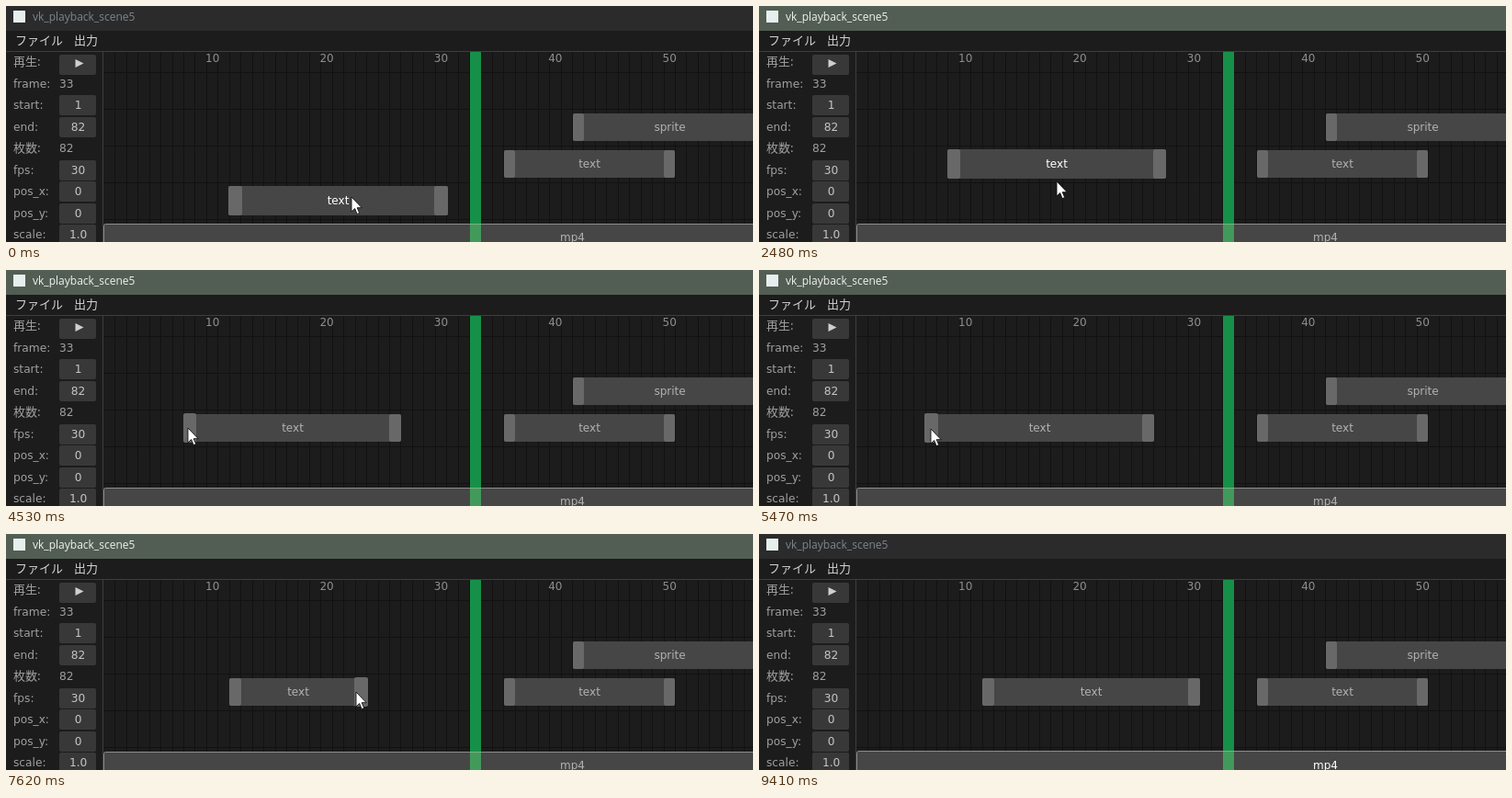
Animation, 813 px wide and 257 px high, one loop 9430 ms. Source, as an HTML page:

```html
<!DOCTYPE html>
<html lang="ja">
<head>
<meta charset="utf-8">
<title>Timeline editor</title>
<style>
  html, body { margin: 0; width: 100%; height: 100%; overflow: hidden; background: #1c1c1c; }
  svg { display: block; }
  text { font: 12px "DejaVu Sans", "Noto Sans CJK JP", sans-serif; fill: #b2b2b2; }
  .mid { text-anchor: middle; }
  .label { font-size: 12.2px; fill: #a0a0a0; }
  .value { fill: #c4c4c4; }
  .cjk { font: 13px "Noto Sans CJK JP", "Noto Sans CJK", sans-serif; }
  .menu { fill: #d2d2d2; }
  .ruler { fill: #8e8e8e; }
  .title { font: 12px "Open Sans", "Noto Sans", sans-serif; }
  .body { fill: #464646; }
  .grip { fill: #686868; }
  .button { fill: #383838; }

  /* The window has focus for most of the loop. */
  #bar { fill: #2b2b2b; animation: bar 9430ms step-end infinite; }
  #title { fill: #7d8590; animation: title 9430ms step-end infinite; }
  @keyframes bar { 5.83% { fill: #525e53; } 99.78% { fill: #2b2b2b; } }
  @keyframes title { 5.83% { fill: #f2f2f2; } 99.78% { fill: #7d8590; } }
</style>
</head>
<body>
<svg width="813" height="257" viewBox="0 0 813 257">
  <rect width="813" height="257" fill="#1c1c1c"/>
  <rect id="bar" width="813" height="27"/>
  <rect x="8" y="5" width="13" height="13" fill="#e6eeee"/>
  <text id="title" class="title" x="29" y="16">vk_playback_scene5</text>
  <text class="cjk menu" x="10" y="41.5">ファイル</text>
  <text class="cjk menu" x="74" y="41.5">出力</text>
  <g id="panel"><path d="M75.5 58L84.5 62.5L75.5 67Z" fill="#cfcfcf"/></g>
  <g id="grid"></g>
  <path d="M0 49.5H813M105.5 50V257" fill="none" stroke="#3e3e3e"/>
  <g id="blocks"></g>
  <rect x="505" y="50" width="12" height="207" fill="#169048"/>
  <g id="tint">
    <rect x="505" y="237" width="12" height="22" fill="#419a5a"/>
    <rect x="505" y="237" width="12" height="1" fill="#78b088"/>
  </g>
  <path id="cursor" d="M0 0V16L3.7 12.6L6.1 18.6L8.7 17.5L6.2 11.7H11.2Z"
        fill="#fff" stroke="#111" stroke-width=".9"/>
</svg>
<script>
const LOOP = 9430, CELL = 12.44, ROW = 40, TOP = 72;
const $ = id => document.getElementById(id);
const cellPos = n => 94.03 + CELL * n;
const cellX = n => Math.round(cellPos(n));
const cellAt = x => Math.floor((x - cellPos(0)) / CELL);
const rowAt = y => Math.floor((y - TOP) / ROW);
const clamp = (v, lo, hi) => Math.min(Math.max(v, lo), hi);

function set(el, attrs) {
  for (const k in attrs) el.setAttribute(k, attrs[k]);
}
function add(parent, tag, attrs, text = "") {
  const el = document.createElementNS("http://www.w3.org/2000/svg", tag);
  set(el, attrs);
  el.textContent = text;
  return parent.appendChild(el);
}

// Side panel; plain values have no button behind them
const fields = {
  "再生:": "", "frame:": "33", "start:": "1", "end:": "82", "枚数:": "82",
  "fps:": "30", "pos_x:": "0", "pos_y:": "0", "scale:": "1.0"
};
const plain = ["frame:", "枚数:"];
Object.entries(fields).forEach(([name, value], i) => {
  const panel = $("panel"), y = Math.round(65 + i * 23.5);
  const cjk = name.charCodeAt(0) > 255 ? " cjk" : "";
  add(panel, "text", { class: "label" + cjk, x: 8, y }, name);
  if (plain.includes(name)) {
    add(panel, "text", { class: "label", x: 58, y }, value);
  } else {
    const top = value ? y - 15 : y - 12;
    panel.prepend(add(panel, "rect", { class: "button", x: 58, y: top, width: 40, height: 22, rx: 2 }));
    add(panel, "text", { class: "mid label value", x: 78.6, y }, value);
  }
});

// Grid and ruler
let lines = "";
for (let n = 2; cellPos(n) < 813; n++) lines += `M${Math.floor(cellPos(n)) + .5} 50V257`;
for (let r = 0; r < 5; r++) lines += `M106 ${TOP + r * ROW + .5}H813`;
add($("grid"), "path", { d: lines, stroke: "#121212" });
for (let n = 10; n <= 50; n += 10)
  add($("grid"), "text", { class: "mid ruler", x: cellPos(n + .5), y: 60.5 }, n);

function makeBlock(name) {
  const part = cls => add($("blocks"), "rect", { class: cls, rx: 2 });
  return { body: part("body"), left: part("grip"), right: part("grip"),
           label: add($("blocks"), "text", { class: "mid" }, name) };
}

// A hovered body or grip grows by one pixel on every side.
function placeBlock(b, { start, end, row }, hover) {
  const y = TOP + row * ROW + 5, all = hover === "body";
  const put = (el, from, to, lit) => {
    const x = cellX(from), pad = lit ? 1 : 0;
    set(el, { x: x - pad, y: y - pad, width: cellX(to) - x + 2 * pad, height: 30 + 2 * pad });
  };
  put(b.body, start, end + 1, all);
  put(b.left, start, start + 1, all || hover === "left");
  put(b.right, end, end + 1, all || hover === "right");
  set(b.label, { x: (cellX(start) + cellX(end + 1)) / 2, y: y + 19 });
  b.label.style.fill = all ? "#fff" : "";
}

placeBlock(makeBlock("sprite"), { start: 42, end: 58, row: 1 });
placeBlock(makeBlock("text"), { start: 36, end: 50, row: 2 });
const clip = makeBlock("text");
const movie = add($("blocks"), "rect", { class: "body", x: 106.5, y: 237.5, width: 1020, height: 40, rx: 2, stroke: "#8c8c8c" });
const movieLabel = add($("blocks"), "text", { class: "mid", x: 616.5, y: 255.5 }, "mp4");

// Pointer strokes: begin, finish, x, y reached; it rests in between
const strokes = [
  [0, 550, 366, 209],
  [1010, 1410, 262, 205],   // move left, back right, then up and down
  [1560, 1930, 325, 204],
  [2230, 3280, 313, 93],
  [3290, 4380, 314, 174],
  [4400, 4480, 198, 172],
  [4960, 5210, 145, 173],   // trim the left edge
  [5210, 5750, 250, 172],
  [5750, 6020, 467, 186],
  [6040, 6480, 425, 172],
  [6570, 7110, 360, 172],   // trim the right edge
  [7110, 7550, 381, 172],
  [7560, 8180, 479, 173],
  [8180, 8570, 440, 262]
];
function pointer(t) {
  let x = 376, y = 208;
  for (const [t0, t1, x1, y1] of strokes) {
    const k = clamp((t - t0) / (t1 - t0), 0, 1);
    x += (x1 - x) * k;
    y += (y1 - y) * k;
  }
  return { x, y };
}

// The clip follows the pointer in whole cells: move, trim left, trim right.
function clipAt(t) {
  const grab = pointer(clamp(t, 550, 4380));
  const start = cellAt(grab.x) - 9;
  if (t < 4960) return { start, end: start + 18, row: rowAt(grab.y) };
  return {
    start: cellAt(pointer(Math.min(t, 5750)).x),
    end: cellAt(pointer(clamp(t, 6570, 8180)).x),
    row: 2
  };
}

function hit({ start, end, row }, { x, y }) {
  const c = cellAt(x);
  if (rowAt(y) !== row || c < start || c > end) return "";
  return c === start ? "left" : c === end ? "right" : "body";
}

// The screen refreshes at a slow, fixed rate.
const TICK = 133.5, LEAD = 50;
const held = t => Math.floor((t + LEAD) / TICK) * TICK - LEAD;

function draw(time) {
  const t = held(time), p = pointer(t), c = clipAt(t);
  const over = rowAt(p.y) >= 4, lift = `translate(0 ${over ? -1 : 0})`;
  placeBlock(clip, c, hit(c, p));
  set(movie, { transform: lift });
  set($("tint"), { transform: lift });
  movieLabel.style.fill = over ? "#fff" : "";
  set($("cursor"), { transform: `translate(${Math.round(p.x)} ${Math.round(p.y)})` });
}

// Share one clock with the CSS animations.
const clock = document.getAnimations()[0];
function tick(now) {
  draw((clock?.currentTime ?? now) % LOOP);
  requestAnimationFrame(tick);
}
draw(0);
requestAnimationFrame(tick);
</script>
</body>
</html>
```
